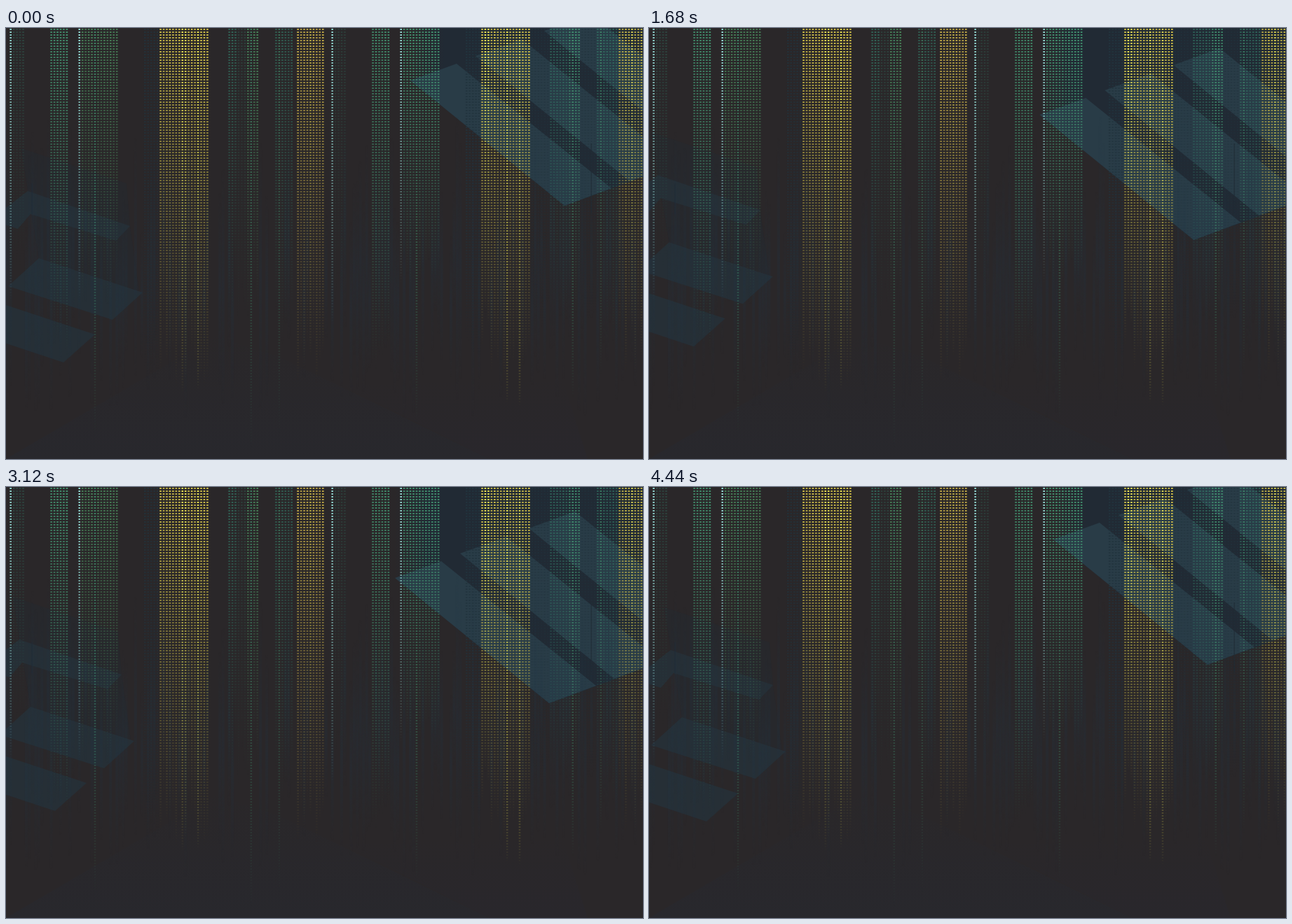
An HTML page with a canvas for the animation above (4.47 s loop, 909 by 616 pixels).

```html
<!DOCTYPE html>
<html lang="en">
<head>
<meta charset="utf-8">
<title>Data rain</title>
<style>
  html, body { margin: 0; width: 100%; height: 100%; overflow: hidden; background: #2a2729; }
  canvas { display: block; }
</style>
</head>
<body>
<canvas id="stage" width="909" height="616"></canvas>
<script>
const W = 909, H = 616, LOOP = 4470, PITCH = W / 204, ROW = 4;
const ctx = document.getElementById('stage').getContext('2d');

// Vertical travel of each slab group: [ms, px]
const RIGHT_KEYS = [[0, 0], [1020, 31], [1680, 49], [2610, 62], [3120, 55], [3660, 36], [LOOP, 0]];
const LEFT_KEYS = [[0, 0], [1020, -16.5], [1850, -23.3], [2610, -20], [3120, -15], [3660, -8], [LOOP, 0]];

const slope = (a, b) => (b[1] - a[1]) / (b[0] - a[0]);

// Smooth curve through the keys, resting at each turning point
function travel(keys, t) {
  const tangent = i => {
    if (i === 0 || i === keys.length - 1) return 0;
    const a = slope(keys[i - 1], keys[i]), b = slope(keys[i], keys[i + 1]);
    return a * b <= 0 ? 0 : 2 * a * b / (a + b);
  };
  let i = 0;
  while (i < keys.length - 2 && t >= keys[i + 1][0]) i++;
  const [t0, v0] = keys[i], [t1, v1] = keys[i + 1];
  const d = t1 - t0, u = (t - t0) / d, s = u * u * (3 - 2 * u);
  return v0 + (v1 - v0) * s + d * u * (1 - u) * ((1 - u) * tangent(i) - u * tangent(i + 1));
}

function layer() {
  const c = document.createElement('canvas');
  c.width = W;
  c.height = H;
  return c;
}

function poly(g, points, fill) {
  g.fillStyle = fill;
  g.beginPath();
  for (let i = 0; i < points.length; i += 2) g.lineTo(points[i], points[i + 1]);
  g.fill();
}

function gradient(g, x0, y0, x1, y1, from, to) {
  const fill = g.createLinearGradient(x0, y0, x1, y1);
  fill.addColorStop(0, from);
  fill.addColorStop(1, to);
  return fill;
}

let seed = 7;
const random = () => (seed = seed * 16807 % 2147483647) / 2147483647;

const PALE = '#91d6d0', GREEN = '#46a078', LEAF = '#51a068', TEAL = '#35806c',
      DIM = '#22343e', GOLD = '#cfbf49', YELLOW = '#f2ea55', AMBER = '#c0a947';

// Column runs: [first, last, colour, opacity, length, falloff]
const RUNS = [
  [1, 1, PALE, 1, 400, 1], [2, 5, TEAL, .35, 330, 1.3],
  [14, 19, GREEN, .85, 450, 1.2], [23, 23, PALE, 1, 410, 1],
  [24, 35, LEAF, .72, 370, 1.2], [28, 28, GREEN, .8, 550, 1],
  [44, 48, DIM, .8, 480, .8],
  [49, 64, GOLD, 1, 480, 1.25], [51, 51, GOLD, 1, 500, 1],
  [56, 57, YELLOW, 1, 510, 1], [61, 61, YELLOW, 1, 510, .85],
  [71, 73, TEAL, .7, 400, 1.2], [74, 76, TEAL, .3, 400, 1],
  [77, 80, LEAF, .75, 390, 1.2], [78, 78, GREEN, .7, 580, 1],
  [86, 91, TEAL, .6, 430, 1.2], [87, 87, GREEN, .65, 540, 1],
  [93, 101, AMBER, 1, 490, 1.2], [97, 97, GOLD, 1, 500, 1],
  [104, 104, PALE, 1, 400, 1], [105, 108, TEAL, .25, 380, 1],
  [117, 122, GREEN, .85, 480, 1.2], [126, 126, PALE, 1, 360, 1],
  [127, 138, GREEN, .9, 350, 1], [131, 131, GREEN, .9, 550, 1],
  [147, 151, DIM, 1, 480, .7],
  [152, 167, GOLD, 1, 480, 1.1], [153, 154, YELLOW, 1, 430, 1],
  [160, 160, YELLOW, 1, 520, .8], [164, 164, YELLOW, 1, 510, .8],
  [168, 173, DIM, .6, 400, .8],
  [174, 179, TEAL, .65, 400, 1.1], [180, 183, GREEN, .8, 400, 1.1],
  [181, 181, GREEN, .8, 570, .9],
  [184, 188, DIM, .6, 400, .8],
  [189, 195, TEAL, .65, 430, 1.1], [190, 190, GREEN, .7, 470, 1],
  [196, 203, GOLD, .95, 470, 1.2], [200, 200, YELLOW, .9, 430, 1]
];

function makeBackdrop() {
  const c = layer(), g = c.getContext('2d');
  g.fillStyle = '#2a2729';
  g.fillRect(0, 0, W, H);
  poly(g, [0, 616, 300, 440, 390, 470, 690, 616], gradient(g, 0, 430, 0, 616, '#2a2729', '#28282d'));
  poly(g, [480, 510, 795, 505, 830, 616, 690, 616], gradient(g, 0, 500, 0, 616, '#2a2729', '#29272c'));
  return c;
}

function makeRain() {
  const c = layer(), g = c.getContext('2d');
  const columns = [];
  for (const [first, last, ...style] of RUNS)
    for (let k = first; k <= last; k++) columns[k] = style;

  for (let k = 0; k < 204; k++) {
    const x = (k + .5) * PITCH;
    // Soft blue streaks below the bright rain
    const top = 120 + random() * 180, end = 390 + random() * 170;
    if (random() < .6) {
      const streak = gradient(g, 0, top, 0, end, '#20364800', '#20364800');
      streak.addColorStop(.5, '#20364838');
      g.fillStyle = streak;
      g.fillRect(x - 2, top, 4, end - top);
    }
    if (!columns[k]) continue;
    const [colour, opacity, length, falloff] = columns[k];
    const reach = length * (.92 + random() * .16);
    const strength = opacity * (.85 + random() * .15);
    g.fillStyle = colour;
    for (let y = 1; y < reach; y += ROW) {
      g.globalAlpha = strength * (1 - y / reach) ** falloff;
      g.fillRect(x - 1.3, y, 2.6, 2);
    }
    g.globalAlpha = 1;
  }
  return c;
}

function drawRight(y) {
  ctx.save();
  ctx.translate(-.4 * y, y);
  poly(ctx, [577, 75, 797, 254, 1060, 158, 1060, -200, 577, -200],
    gradient(ctx, 577, 0, 625, 0, '#212a3400', '#212a34'));
  for (const [px, py] of [[577, 75], [670, 40], [768, 4]])
    poly(ctx, [px, py, px + 66, py - 24, px + 287, py + 154, px + 220, py + 179], '#293c47');
  ctx.restore();
}

function drawLeft(y) {
  ctx.save();
  ctx.translate(.8 * y, y);
  poly(ctx, [22, 172, 172, 222, 177, 283, 190, 376, 47, 329, 31, 233], '#20293452');
  const fill = '#262f36';
  poly(ctx, [31, 233, 177, 283, 157, 304, 35, 266, 17, 287, -40, 269, -40, 288], fill);
  poly(ctx, [47, 329, 195, 378, 152, 417, 3, 369], fill);
  poly(ctx, [-21, 389, 127, 438, 82, 478, -66, 429], fill);
  ctx.restore();
}

const backdrop = makeBackdrop(), rain = makeRain();

function draw(now) {
  const t = now % LOOP;
  ctx.drawImage(backdrop, 0, 0);
  drawRight(travel(RIGHT_KEYS, t));
  drawLeft(travel(LEFT_KEYS, t));
  ctx.fillStyle = '#202a3499';
  ctx.fillRect(36.5, 222, 1.5, 44);
  ctx.fillRect(834.5, 165, 1.5, 100);
  ctx.drawImage(rain, 0, 0);
  requestAnimationFrame(() => draw(performance.now()));
}
draw(performance.now());
</script>
</body>
</html>
```
